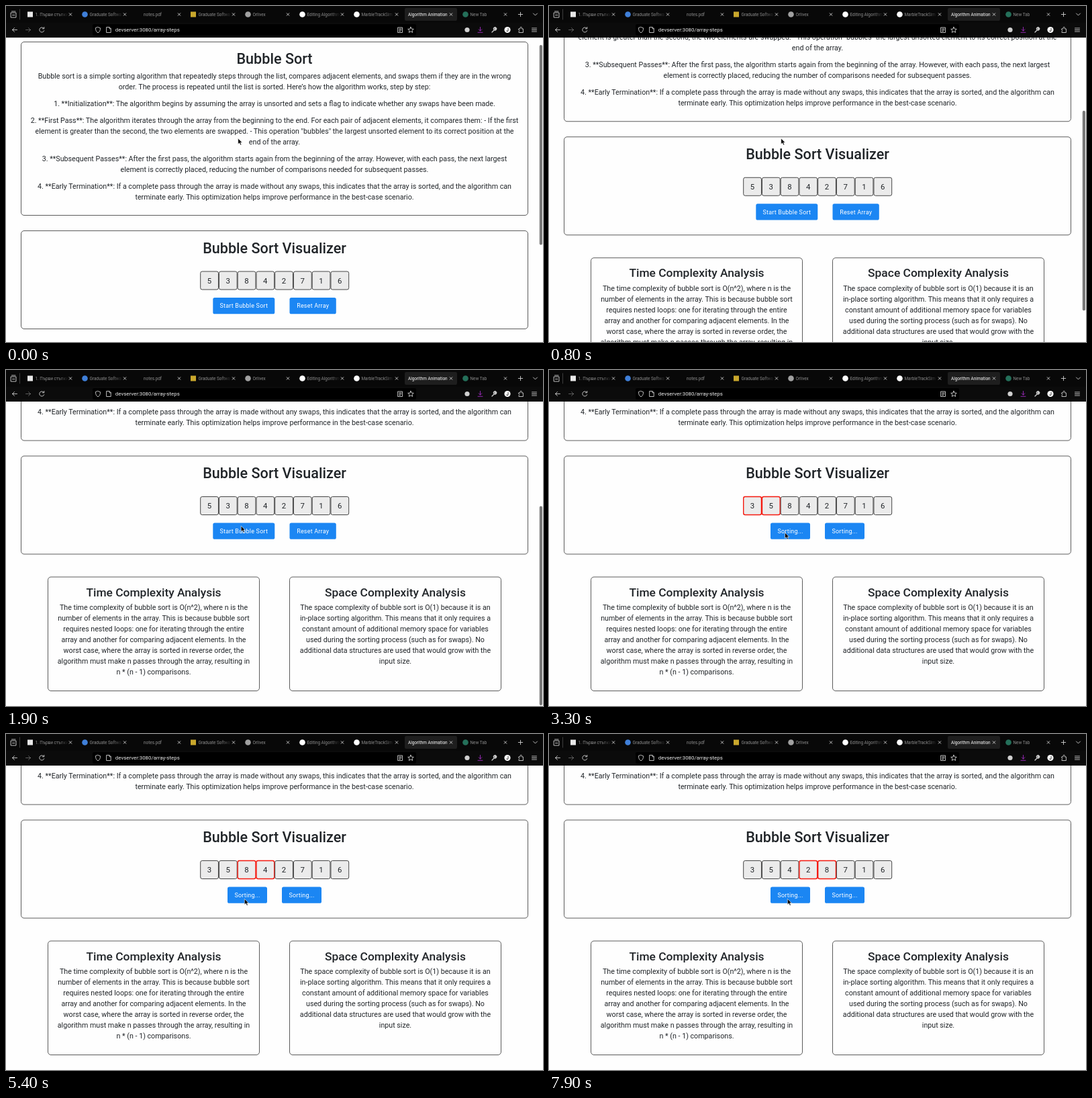
These frames come from a looping animation (800x500 px, 8000 ms). An HTML page:

```html
<!DOCTYPE html>
<html lang="en">
<head>
<meta charset="utf-8">
<title>Bubble sort page</title>
<style>
  html, body { margin: 0; width: 100%; height: 100%; overflow: hidden; background: #fefefe; }
  svg { display: block; width: 100%; height: 100%; }
  text { font-family: Roboto, Inter, Arial, sans-serif; fill: #212529; }
  .mid { text-anchor: middle; }
  .body { font-size: 10.7px; }
  .title { font-size: 21.6px; font-weight: 500; }
  .subtitle { font-size: 17.4px; font-weight: 500; }
  .digit { font-size: 11.4px; }
  .label { font-size: 9px; letter-spacing: .2px; fill: #fff; }
  .tab { font-size: 6.4px; fill: #8c8c8c; }
  .tab.on { fill: #fff; }
  .card { fill: none; stroke: #333; stroke-width: .8; }
  .icon { fill: none; stroke: #d0d0d0; stroke-width: .9; stroke-linecap: round; stroke-linejoin: round; }
</style>
</head>
<body>
<svg id="stage" viewBox="0 0 800 500" preserveAspectRatio="none">
  <defs>
    <clipPath id="view"><rect y="47" width="800" height="453"/></clipPath>
    <linearGradient id="fade"><stop offset="0" stop-color="#080808" stop-opacity="0"/><stop offset="1" stop-color="#080808"/></linearGradient>
  </defs>
  <rect width="800" height="500" fill="#fefefe"/>
  <g clip-path="url(#view)">
    <g id="page"></g>
    <rect id="thumb" x="794.8" width="4.2" rx="2.1" fill="#777"/>
  </g>
  <g id="chrome"></g>
  <path id="cursor" d="M0 0V8.6L2 6.8L3.5 10L5 9.3L3.6 6.3H6.2Z" fill="#000" stroke="#fff" stroke-width=".6"/>
</svg>
<script>
const LOOP = 8000, SORT_START = 2250, PAUSE = 850;
const VALUES = [5, 3, 8, 4, 2, 7, 1, 6];
const CELL = 27.75, CELL_LEFT = 289.2;
const $ = id => document.getElementById(id);
const page = $('page'), chrome = $('chrome');

function add(parent, name, attrs, content) {
  const node = document.createElementNS('http://www.w3.org/2000/svg', name);
  for (const key in attrs) node.setAttribute(key, attrs[key]);
  if (content !== undefined) node.textContent = content;
  parent.append(node);
  return node;
}
const rect = (parent, x, y, width, height, attrs) =>
  add(parent, 'rect', { x, y, width, height, ...attrs });
const centred = (style, x, y, words) =>
  add(page, 'text', { class: 'mid ' + style, x, y }, words);
const card = (x, y, width, height) =>
  rect(page, x, y, width, height, { rx: 4.5, class: 'card' });
const paragraph = (x, y, lines) =>
  lines.forEach((line, i) => centred('body', x, y + 16 * i, line));
const icon = d => add(chrome, 'path', { class: 'icon', d });

// Page content
card(22.5, 53.5, 755, 258);
centred('title', 400, 86.5, 'Bubble Sort');
paragraph(400, 108, [
  'Bubble sort is a simple sorting algorithm that repeatedly steps through the list, compares adjacent elements, and swaps them if they are in the wrong',
  'order. The process is repeated until the list is sorted. Here’s how the algorithm works, step by step:']);
paragraph(400, 149, [
  '1. **Initialization**: The algorithm begins by assuming the array is unsorted and sets a flag to indicate whether any swaps have been made.']);
paragraph(400, 174, [
  '2. **First Pass**: The algorithm iterates through the array from the beginning to the end. For each pair of adjacent elements, it compares them: - If the first',
  'element is greater than the second, the two elements are swapped. - This operation "bubbles" the largest unsorted element to its correct position at the',
  'end of the array.']);
paragraph(400, 231, [
  '3. **Subsequent Passes**: After the first pass, the algorithm starts again from the beginning of the array. However, with each pass, the next largest',
  'element is correctly placed, reducing the number of comparisons needed for subsequent passes.']);
paragraph(400, 272, [
  '4. **Early Termination**: If a complete pass through the array is made without any swaps, this indicates that the array is sorted, and the algorithm can',
  'terminate early. This optimization helps improve performance in the best-case scenario.']);

card(22.5, 334.5, 755, 146);
centred('title', 400, 367.7, 'Bubble Sort Visualizer');
const cells = VALUES.map((_, i) => {
  const x = CELL_LEFT + i * CELL;
  return {
    box: rect(page, x + .5, 395, CELL - 1, 27, { rx: 2.5, fill: '#ebebeb' }),
    digit: centred('digit', x + CELL / 2, 412.8, '')
  };
});
const buttons = [0, 1].map(() => ({
  box: rect(page, 0, 434, 0, 24.3, { rx: 2.6, fill: '#1b86f3' }),
  label: centred('label', 0, 449.4, '')
}));

card(62.5, 514.5, 315, 169.5);
centred('subtitle', 220, 543.2, 'Time Complexity Analysis');
paragraph(220, 563.8, [
  'The time complexity of bubble sort is O(n^2), where n is the',
  'number of elements in the array. This is because bubble sort',
  'requires nested loops: one for iterating through the entire',
  'array and another for comparing adjacent elements. In the',
  'worst case, where the array is sorted in reverse order, the',
  'algorithm must make n passes through the array, resulting in',
  'n * (n - 1) comparisons.']);
card(422.5, 514.5, 315, 169.5);
centred('subtitle', 580, 543.2, 'Space Complexity Analysis');
paragraph(580, 563.8, [
  'The space complexity of bubble sort is O(1) because it is an',
  'in-place sorting algorithm. This means that it only requires a',
  'constant amount of additional memory space for variables',
  'used during the sorting process (such as for swaps). No',
  'additional data structures are used that would grow with the',
  'input size.']);

// Browser window: tab strip
rect(chrome, 0, 0, 800, 47, { fill: '#080808' });
rect(chrome, 0, 24.5, 800, 22.5, { fill: '#0b0b0b' });
rect(chrome, 594, 3, 78, 19, { rx: 2.2, fill: '#1e1e1e' });
rect(chrome, 129, 27, 482, 17, { rx: 2.2, fill: '#000' });
const tabs = [
  ['1. Първи стъпки', '#e8e8e8', 1], ['Graduate Softwa', '#3f7fd8'],
  ['notes.pdf'], ['Graduate Softwa', '#c9a72c', 1], ['Orlivex', '#a0a0a0'],
  ['Editing Algorithm', '#fff'], ['MarbleTrackSim', '#fff'],
  ['Algorithm Animation'], ['New Tab', '#24705a']];
tabs.forEach(([name, colour, square], i) => {
  const left = 24 + 81 * i, on = i === 7;
  if (colour && square) rect(chrome, left + 8, 8.5, 8, 8, { fill: colour });
  else if (colour) add(chrome, 'circle', { cx: left + 12.5, cy: 12.5, r: 4.3, fill: colour });
  const x = on ? 599 : i === 2 ? 205 : left + 19.5;
  add(chrome, 'text', { class: on ? 'tab on' : 'tab', x, y: 14.8 }, name);
  if (!on) {
    rect(chrome, left + 54, 6, 15, 13, { fill: 'url(#fade)' });
    rect(chrome, left + 69, 6, 11, 13, { fill: '#080808' });
  }
  icon(`M${left + 70.2} 10.7l3.6 3.6m0-3.6l-3.6 3.6`);
});
icon('M7.5 10h7.5v7h-7.5zM8.5 8h5.5M9.5 13.5h3.5');
icon('M20.5 5v15').style.stroke = '#444';
icon('M763.3 12.5h6.4m-3.2-3.2v6.4M785.5 11l3 3 3-3');

// Browser window: toolbar
icon('M16.5 35.5h-7m3-3l-3 3 3 3');
icon('M29.5 35.5h7m-3-3l3 3-3 3').style.opacity = .45;
icon('M56.3 33.3a3.6 3.6 0 1 0 .5 3.4M56.8 31.5v2.3h-2.4');
icon('M137 31.5l3.5 1.3c0 4-1 5.6-3.5 7-2.5-1.4-3.5-3-3.5-7z');
icon('M150 31.5h4l2.2 2.2v5.8h-6.2zM154 31.5v2.3h2.2');
icon('M584 32h6.5v7.5h-6.5zM585.6 34h3.3m-3.3 1.8h3.3m-3.3 1.8h2');
icon('M603 31.3l1.3 2.8 3 .3-2.3 2 .7 3-2.7-1.6-2.7 1.6.7-3-2.3-2 3-.3z');
add(chrome, 'text', { x: 162.8, y: 38.2, style: 'font-size:7.9px;fill:#eee' }, 'devserver:3080/array-steps');
add(chrome, 'circle', { cx: 687, cy: 35.5, r: 3.6, fill: '#d0d0d0' });
icon('M706.5 31.5v5.5m-2.3-2.2l2.3 2.3 2.3-2.3M703 39.3h7').style.stroke = '#a32bc4';
icon('M724 39l4-4m2.5-2.2l-1.4 1.4-1-1 1.3-1.4a2.2 2.2 0 1 0 1.1 1z').style.strokeWidth = 1.3;
add(chrome, 'circle', { cx: 747, cy: 35.5, r: 4.6, fill: '#fff' });
add(chrome, 'text', { class: 'mid', x: 747, y: 38, style: 'font-size:6.5px;font-weight:500;fill:#111' }, 'J');
icon('M764 34h2v-1.5a1.2 1.2 0 0 1 2.4 0V34h2v5.5h-6.4v-1.8a1.2 1.2 0 0 0 0-2.2z');
icon('M783.5 33h7m-7 2.5h7m-7 2.5h7');

// Motion: keys are [time, value, slope per ms]
const SCROLL = [[0, 0, 0], [500, 65, .2], [800, 139.5, .22], [1300, 211, 0], [1700, 206.5, 0]];
const POINTER_X = [[1450, 345.7, 0], [2100, 351.5, 0], [3500, 351.5, 0], [4100, 355.3, 0]];
const POINTER_Y = [[1450, 197, 0], [2100, 242, 0], [3500, 242, 0], [4100, 245.3, 0]];

function follow(keys, t) {
  if (t <= keys[0][0]) return keys[0][1];
  const next = keys.findIndex(key => key[0] > t);
  if (next < 0) return keys[keys.length - 1][1];
  const [t0, a, slopeA] = keys[next - 1], [t1, b, slopeB] = keys[next];
  const span = t1 - t0, u = (t - t0) / span, v = 1 - u;
  return a * v * v * (1 + 2 * u) + b * u * u * (1 + 2 * v)
    + span * u * v * (slopeA * v - slopeB * u);
}

function sortState(t) {
  const list = [...VALUES];
  let clock = SORT_START, active = -9;
  for (let j = 0; j < list.length - 1 && t >= clock; j++) {
    active = j;
    clock += PAUSE;
    if (list[j] > list[j + 1]) {
      if (t >= clock) [list[j], list[j + 1]] = [list[j + 1], list[j]];
      clock += PAUSE;
    }
  }
  return { list, active };
}

function setButton({ box, label }, x, width, words) {
  box.setAttribute('x', x);
  box.setAttribute('width', width);
  label.setAttribute('x', x + width / 2);
  label.textContent = words;
}

function render(t) {
  const scroll = follow(SCROLL, t);
  page.setAttribute('transform', `translate(0 ${-scroll})`);
  const top = 58 + .7 * scroll;
  const thumb = $('thumb');
  thumb.setAttribute('y', top);
  thumb.setAttribute('height', Math.min(297.5, 499 - top));
  thumb.setAttribute('opacity', Math.max(0, Math.min(1, (2400 - t) / 300)));

  const { list, active } = sortState(t);
  cells.forEach(({ box, digit }, i) => {
    const hot = i === active || i === active + 1;
    box.setAttribute('stroke', hot ? '#f5190f' : '#333');
    box.setAttribute('stroke-width', hot ? 1.4 : .9);
    digit.textContent = list[i];
  });
  const sorting = t >= SORT_START;
  setButton(buttons[0], sorting ? 330 : 308.3, sorting ? 59 : 92, sorting ? 'Sorting...' : 'Start Bubble Sort');
  setButton(buttons[1], sorting ? 411 : 422.5, sorting ? 59 : 69.3, sorting ? 'Sorting...' : 'Reset Array');

  $('cursor').setAttribute('transform', `translate(${follow(POINTER_X, t)} ${follow(POINTER_Y, t)})`);
}

const begin = performance.now();
function tick() {
  render((performance.now() - begin) % LOOP);
  requestAnimationFrame(tick);
}
tick();
</script>
</body>
</html>
```
